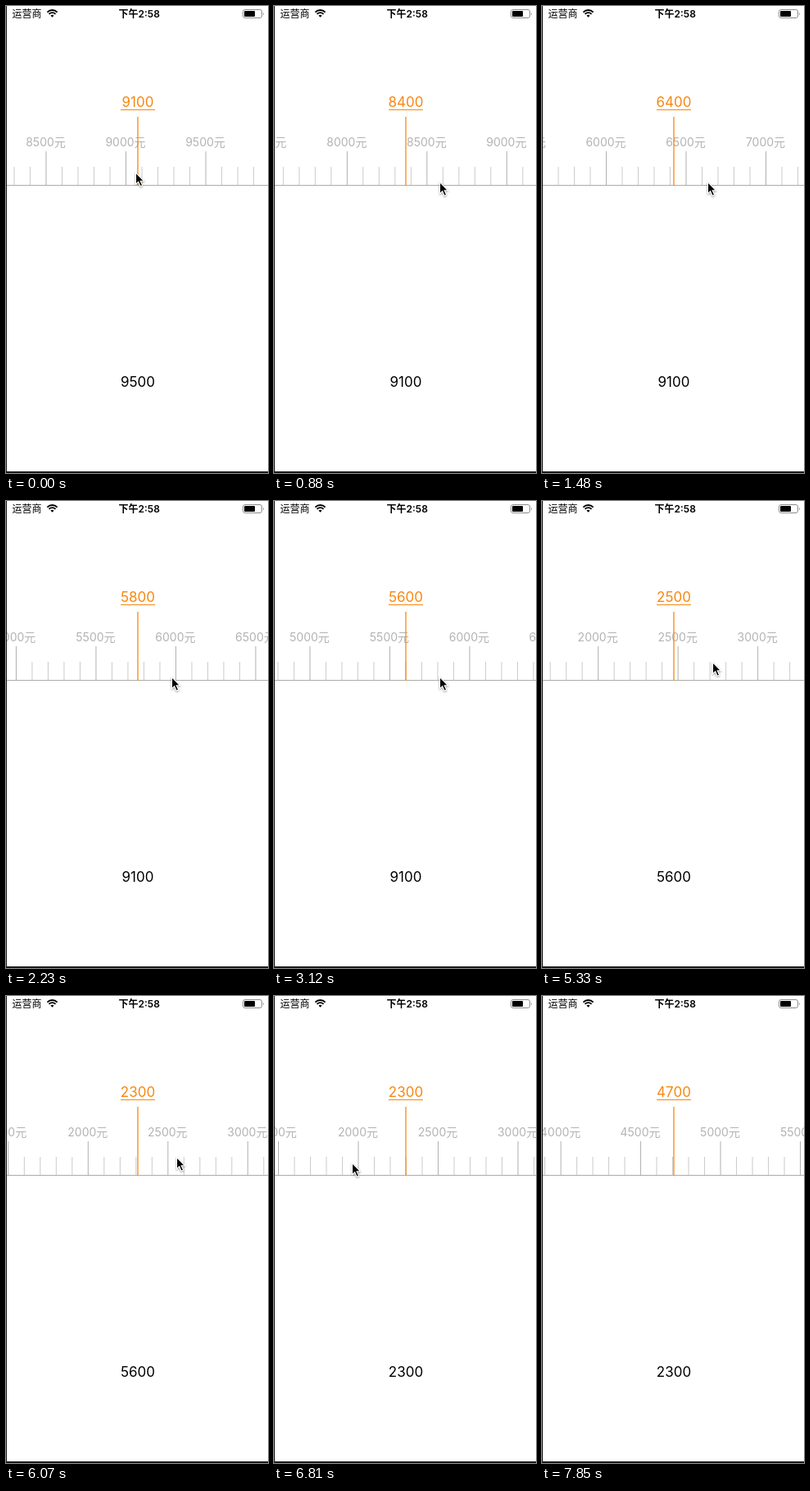
Write an HTML page that moves like this. It is 320x569 px and loops after 8000 ms.

```html
<!DOCTYPE html>
<html lang="zh">
<head>
<meta charset="utf-8">
<style>
  html, body { margin: 0; width: 100%; height: 100%; overflow: hidden; background: #fff; }
  svg { display: block; width: 100vw; height: 100vh; }
  text { font-family: Inter, "Noto Sans CJK SC", "Noto Sans CJK", sans-serif; text-anchor: middle; }
  .value { font-size: 17px; }
  .label { font-size: 14px; fill: #b3b3b3; }
  .status { font-size: 12px; }
</style>
</head>
<body>
<svg viewBox="0 0 320 569">
  <rect width="320" height="569" fill="#fff"/>

  <text class="status" x="25.5" y="13.5">运营商</text>
  <g fill="none" stroke="#000" stroke-width="1.9">
    <path d="M50.4 7.6a8.6 8.6 0 0 1 12.2 0M52.5 9.8a5.6 5.6 0 0 1 8 0"/>
    <path d="M56.5 13.8l-2-2.1a2.9 2.9 0 0 1 4 0z" fill="#000" stroke="none"/>
  </g>
  <text class="status" x="162.7" y="13.5" font-weight="600">下午2:58</text>
  <rect x="289.5" y="4.5" width="23" height="10" rx="2.4" fill="none" stroke="#8c8c8c"/>
  <rect x="291" y="6" width="13" height="7" rx="1"/>
  <path d="M314 7.5q1.6 2 0 4z" fill="#8c8c8c"/>

  <g id="ruler"></g>
  <rect y="218" width="320" height="1" fill="#acacac"/>
  <g fill="#f7870f">
    <text id="current" class="value" x="161" y="123"></text>
    <rect x="140" y="126" width="42" height="1"/>
    <rect x="160" y="135" width="2" height="84" opacity=".65"/>
  </g>
  <text id="picked" class="value" x="161" y="464"></text>

  <path id="cursor" d="M0 0v14.2l3.2-3 2.4 5.5 2.5-1.1-2.4-5.3h4.4z" stroke="#fff" stroke-width="1.1"
        style="filter:drop-shadow(0 1px 1px #0006)"/>
  <path d="M0 0h1v567h319v2H0z" fill="#1c1c1c"/>
</svg>
<script>
const LOOP = 8000, STEP = 148.2;
const UNIT = 0.195, CENTER = 161.5;                        // ruler px per yuan, px of the reading
const DRAG = 120, GLIDE = 250, SNAP = 250, DECAY = 500;    // ms
const NEAR = 30;                                           // yuan left when a fling gives way to the snap
const $ = id => document.getElementById(id);

// The pointer arrives at `from`, drags to `to`; the ruler then coasts towards `rest`
const gestures = [
  { ready: -300, release: 0, from: [76, 203], to: [158.5, 203], rest: 9077 },
  { ready: 640, release: 854, from: [100, 208], to: [202.5, 214.5], rest: 5570 },
  { ready: 3700, release: 4051, from: [93, 198], to: [208.5, 196.5], rest: 2266 },
  { ready: 6810, release: 7462, from: [95.5, 203.5], to: [-10, 203.5], rest: 6277 }
];

const progress = (t, start, length) => Math.min(1, Math.max(0, (t - start) / length));
const ease = p => p * p * (3 - 2 * p);
const mix = (a, b, p) => a + (b - a) * p;
const mixPoint = (a, b, p) => a.map((v, i) => mix(v, b[i], p));
const round = v => Math.round(v / 100) * 100;

function stateAt(t) {
  let value = 9500, picked = 9500, pointer = gestures[0].from;
  for (const { ready, release, from, to, rest } of gestures) {
    pointer = mixPoint(pointer, from, ease(progress(t, ready - GLIDE, GLIDE)));
    const held = progress(t, release - DRAG, DRAG);
    pointer = mixPoint(pointer, to, held);
    value -= (to[0] - from[0]) / UNIT * held;
    if (t < release) break;

    const offset = value - rest;
    const coast = DECAY * Math.max(0, Math.log(Math.abs(offset) / NEAR));
    const time = Math.min(t - release, coast);
    value = rest + offset * Math.exp(-time / DECAY);
    if (t <= release + coast) break;

    picked = round(value);
    value = mix(value, picked, ease(progress(t, release + coast, SNAP)));
  }
  return { value, picked, pointer };
}

let marks = "";
for (let v = 1000; v < 10000; v += 100) {
  const x = v * UNIT - 0.5, major = v % 500 === 0, top = major ? 177 : 196;
  marks += `<rect x="${x}" y="${top}" width="1" height="${218 - top}" fill="${major ? "#b0b0b0" : "#cbcbcb"}"/>`;
  if (major) marks += `<text class="label" x="${x}" y="171">${v}元</text>`;
}
$("ruler").innerHTML = marks;

function draw(now) {
  const t = Math.floor((now % LOOP + 12) / STEP) * STEP;
  const { value, picked, pointer } = stateAt(t);
  $("ruler").setAttribute("transform", `translate(${CENTER - value * UNIT})`);
  $("current").textContent = round(value);
  $("picked").textContent = picked;
  $("cursor").setAttribute("transform", `translate(${pointer})`);
}

const begin = performance.now();
function tick() {
  draw(performance.now() - begin);
  requestAnimationFrame(tick);
}
tick();
</script>
</body>
</html>
```
